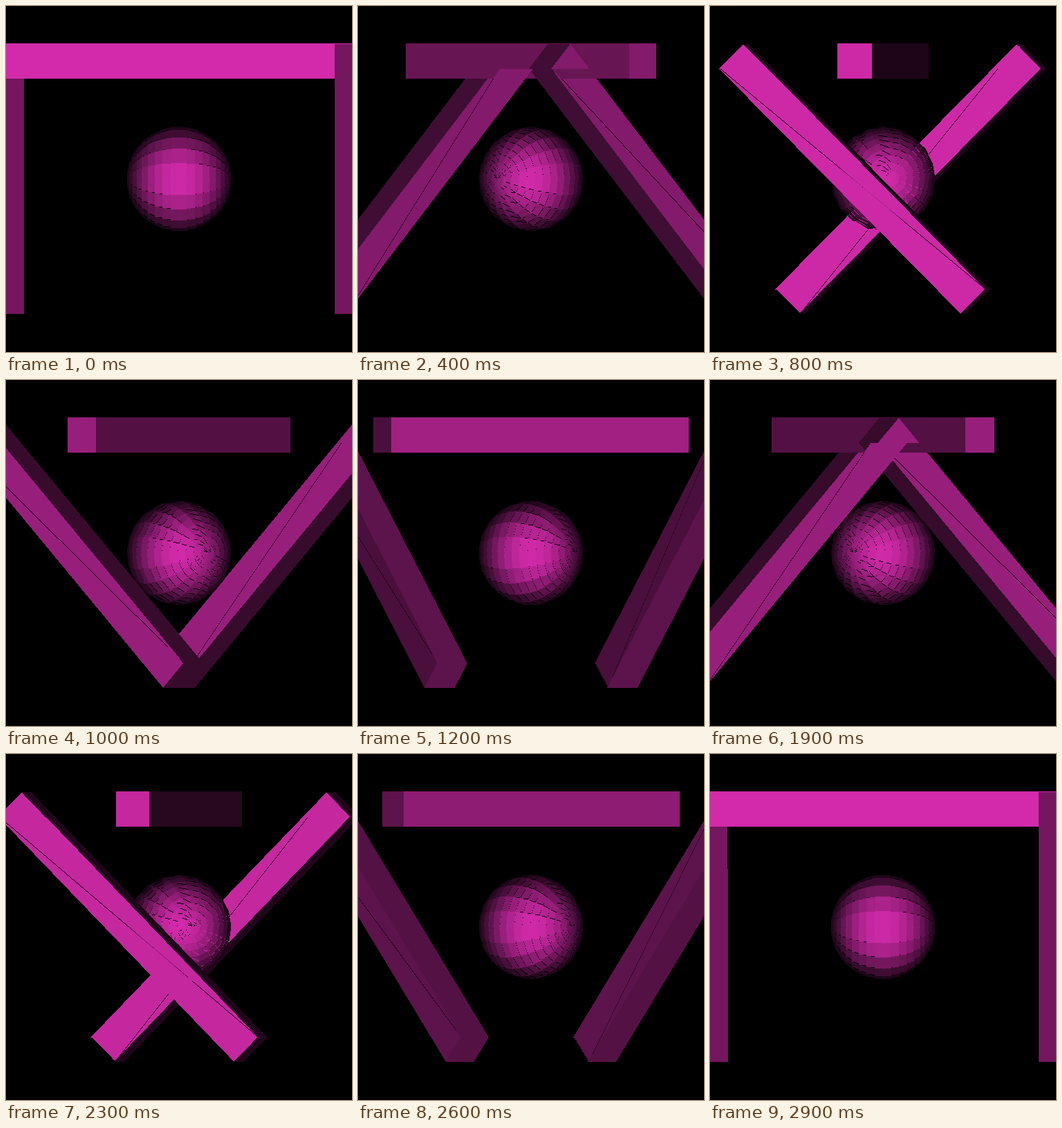
Recreate the animation shown at these times as an HTML page with a canvas. Size 500 by 500 pixels, loop 3 s.

```html
<!DOCTYPE html>
<html lang="en">
<head>
<meta charset="utf-8">
<title>Rotating bars and sphere</title>
<style>
  html, body { margin: 0; width: 100%; height: 100%; overflow: hidden; background: #000; }
  canvas { display: block; width: 500px; height: 500px; }
</style>
</head>
<body>
<canvas id="stage" width="500" height="500"></canvas>
<script>
const SIZE = 500, MID = 250, FRAMES = 30, STEP = 100;
const ctx = document.getElementById('stage').getContext('2d');
const image = ctx.createImageData(SIZE, SIZE);
const pixels = new Uint32Array(image.data.buffer);
const depth = new Float64Array(SIZE * SIZE);

const add = (a, b, k = 1) => a.map((v, i) => v + k * b[i]);
const dot = (a, b) => a[0] * b[0] + a[1] * b[1] + a[2] * b[2];
const cross = (a, b) => [
  a[1] * b[2] - a[2] * b[1],
  a[2] * b[0] - a[0] * b[2],
  a[0] * b[1] - a[1] * b[0]
];

// A solid is a list of triangles with outward normals.
function solid(center, quads, spin, skew) {
  const tris = [];
  for (const [a, b, c, d] of quads) {
    for (const t of [[a, b, c], [a, c, d]]) {
      const n = cross(add(t[1], t[0], -1), add(t[2], t[0], -1));
      const len = Math.hypot(...n);
      if (len < 1e-6) continue;
      const side = dot(n, add(t[0], center, -1)) < 0 ? -1 : 1;
      tris.push({ points: t, normal: n.map(v => v * side / len) });
    }
  }
  return { tris, spin, skew };
}

function box(center, p, q, r) {
  const quads = [];
  for (const [u, v, w] of [[r, p, q], [p, q, r], [q, r, p]]) {
    for (const s of [1, -1]) {
      const corner = (i, j) => add(add(add(center, u, s), v, i), w, j);
      quads.push([corner(1, -s), corner(1, s), corner(-1, s), corner(-1, -s)]);
    }
  }
  return solid(center, quads, 1, 8);
}

function sphere(radius, n) {
  const at = (i, j) => {
    const lat = Math.PI * j / n, lon = 2 * Math.PI * i / n;
    return [
      radius * Math.cos(lat),
      radius * Math.sin(lat) * Math.cos(lon),
      radius * Math.sin(lat) * Math.sin(lon)
    ];
  };
  const quads = [];
  for (let i = 0; i < n; i++)
    for (let j = 0; j < n; j++)
      quads.push([at(i, j), at(i, j + 1), at(i + 1, j + 1), at(i + 1, j)]);
  return solid([0, 0, 0], quads, -1, 0);
}

const h = Math.SQRT1_2;
const leg = s => box([s * 250, 0, 0], [s * 25, 0, 0],
  [0, 250 * h, s * 250 * h], [0, 25 * h, -s * 25 * h]);
const scene = [
  box([0, 170, 0], [250, 0, 0], [0, 25, 0], [0, 0, 25]),
  leg(1), leg(-1), sphere(75, 20)
];

function shade(facing) {
  const v = 25 + 185 * facing * facing;
  return (255 << 24 | Math.round(v * .81) << 16 | Math.round(v * .2) << 8 | Math.round(v)) >>> 0;
}

// Point on edge pq at scanline y, as [x, z].
function along(p, q, y) {
  const y0 = Math.floor(p[1]);
  const k = (y - y0) / Math.max(1, Math.floor(q[1]) - y0);
  return [p[0] + (q[0] - p[0]) * k, p[2] + (q[2] - p[2]) * k];
}

function fill(points, color, skew) {
  const [b, m, t] = points.sort((p, q) => p[1] - q[1]);
  const yb = Math.floor(b[1]), ym = Math.floor(m[1]), yt = Math.floor(t[1]);
  const flat = yb === ym || ym === yt;
  for (let y = Math.max(0, yb); y <= Math.min(SIZE - 1, yt); y++) {
    const low = ym === yt || y < ym;
    const [p, q] = low ? [b, m] : [m, t];
    let [x0, z0] = along(b, t, y), [x1, z1] = along(p, q, y);
    const longLeft = x0 < x1;
    let lo = Math.floor(Math.min(x0, x1));
    let hi = Math.floor(Math.max(x0, x1));
    // Below the middle corner the left end runs one step off, leaving hairline seams.
    if (low && !flat) {
      const near = longLeft ? along(b, t, y + 1) : along(b, m, y - 1);
      const next = Math.floor(near[0]);
      if (next > lo) lo = next + 1;
      if (skew) {
        z0 = b[2] - skew * (z0 - b[2]);
        z1 = b[2] - skew * (z1 - b[2]);
      }
    }
    lo = Math.max(0, lo);
    hi = Math.min(SIZE - 1, hi);
    const dz = Math.abs(x1 - x0) < 1 ? 0 : (z1 - z0) / (x1 - x0);
    const row = (SIZE - 1 - y) * SIZE;
    for (let x = lo; x <= hi; x++) {
      const z = z0 + (x - x0) * dz;
      if (z > depth[row + x]) {
        depth[row + x] = z;
        pixels[row + x] = color;
      }
    }
  }
}

function draw(frame) {
  pixels.fill(0xff000000);
  depth.fill(-Infinity);
  const angle = 2 * Math.PI * frame / (FRAMES - 1);
  for (const { tris, spin, skew } of scene) {
    const c = Math.cos(angle), s = Math.sin(angle) * spin;
    const turn = ([x, y, z]) => [x * c - z * s, y, x * s + z * c];
    for (const { points, normal } of tris) {
      const facing = turn(normal)[2];
      if (facing < 1e-6) continue;
      fill(points.map(p => add(turn(p), [MID, MID, 0])), shade(facing), skew);
    }
  }
  ctx.putImageData(image, 0, 0);
}

let shown = -1;
const start = performance.now();
function tick() {
  const frame = Math.floor((performance.now() - start) / STEP) % FRAMES;
  if (frame !== shown) draw(shown = frame);
  requestAnimationFrame(tick);
}
tick();
</script>
</body>
</html>
```
